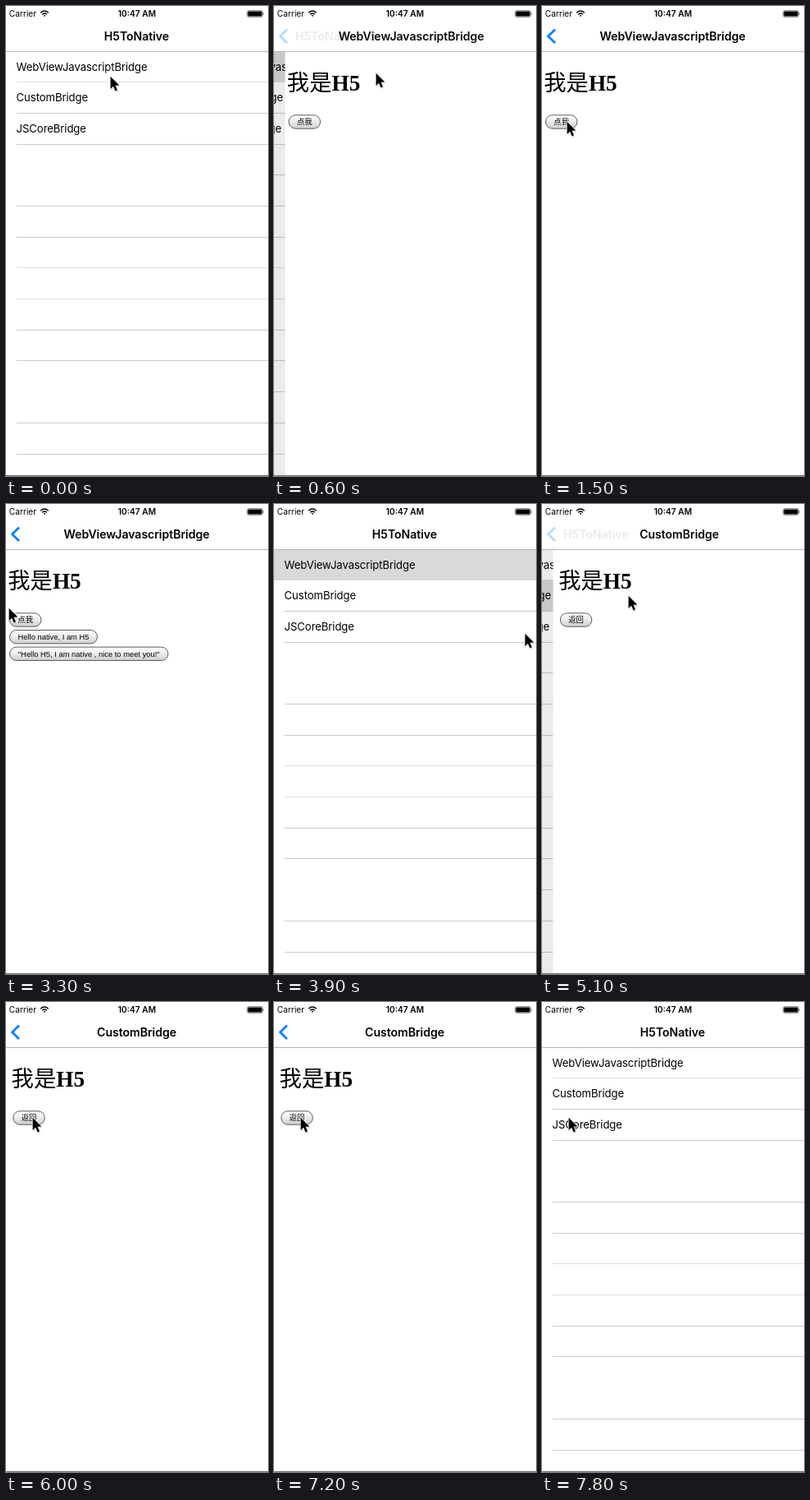
Recreate the animation shown at these times as an HTML page. Size 320 by 572 pixels, loop 8 s.

```html
<!DOCTYPE html>
<html lang="en">
<head>
<meta charset="utf-8">
<title>H5ToNative</title>
<style>
  html, body { margin: 0; width: 100%; height: 100%; overflow: hidden; background: #fff; }
  svg { display: block; }
  text { fill: #000; white-space: pre; }
  .status { font: 400 10.2px Inter, sans-serif; }
  .clock { font-weight: 600; }
  .title { font: 600 14.2px Inter, sans-serif; letter-spacing: -.1px; text-anchor: middle; }
  .row { font: 400 13.2px Inter, sans-serif; letter-spacing: -.12px; }
  .head { font: 700 27.3px "Liberation Serif", serif; }
  .han { font-family: "Noto Sans CJK SC", "Noto Sans CJK", sans-serif; font-weight: 500; }
  .btn { font: 400 9.4px "Liberation Sans", "Noto Sans CJK SC", "Noto Sans CJK", sans-serif; text-anchor: middle; }
</style>
</head>
<body>
<svg width="320" height="572" viewBox="0 0 320 572">
  <defs>
    <linearGradient id="gloss" x2="0" y2="1">
      <stop offset="0" stop-color="#fff"/>
      <stop offset=".5" stop-color="#ebebeb"/>
      <stop offset="1" stop-color="#cdcdcd"/>
    </linearGradient>
  </defs>
  <rect width="320" height="572" fill="#fff"/>
  <g id="list"></g>
  <rect id="dim" y="56" width="320" height="515"/>
  <g id="page"></g>
  <rect width="320" height="55" fill="#fff"/>
  <path d="M0 55.5H320" stroke="#b4b4b4"/>
  <path d="M0 571.5H320" stroke="#707070"/>
  <text class="title" id="home" x="159.5" y="42">H5ToNative</text>
  <text class="title" id="name" x="159.5" y="42"></text>
  <path id="back" d="M16 28.5L7.6 36.8L16 45" fill="none" stroke="#0f80fb" stroke-width="2.8"/>
  <text class="status" x="3.8" y="13">Carrier</text>
  <g fill="none" stroke="#000" stroke-width="1.5">
    <path d="M42.2 8.2Q47 3.8 51.8 8.2M44.2 10.2Q47 7.8 49.8 10.2"/>
    <path d="M47 13L45.6 11.5Q47 10.4 48.4 11.5Z" fill="#000" stroke="none"/>
  </g>
  <text class="status clock" x="136.8" y="13">10:47 AM</text>
  <rect x="294.6" y="5.6" width="18.8" height="7.8" rx="1.8" fill="none" stroke="#555" stroke-width=".7"/>
  <rect x="295.4" y="6.4" width="17.2" height="6.2" rx="1"/>
  <path d="M314.3 8.2Q315.8 9.6 314.3 11Z"/>
  <g id="cursor">
    <g transform="translate(.6 .8) scale(.94)">
      <path d="M1 2V18L4.7 14.5L7.3 20.3L10 19.1L7.4 13.5L12.5 13.3Z" opacity=".18"/>
      <path d="M0 0V16.2L3.7 12.7L6.3 18.7L9 17.5L6.4 11.7L11.5 11.5Z"
        stroke="#fff" stroke-width="1.6" paint-order="stroke"/>
    </g>
  </g>
</svg>
<script>
const $ = id => document.getElementById(id);
const LOOP = 8000, TICK = 300, PUSH = 500, WIDTH = 320, PITCH = 37.69;
const rows = ["WebViewJavascriptBridge", "CustomBridge", "JSCoreBridge"];
const greetings = ["Hello native, I am H5", '"Hello H5, I am native , nice to meet you!"'];

// All times in ms; the first page is dragged away by the cursor, the second closes at once.
const visits = [
  { page: 0, open: 300, greet: 2100, drag: 3300, close: 3900, deselect: 4200 },
  { page: 1, open: 4800, close: 7500, deselect: 7500 }
];

// Cursor stops: time, x, y
const stops = [
  [0, 127, 85], [300, 124, 81], [900, 124, 81], [1200, 106, 106], [1500, 30, 140],
  [2400, 30, 140], [2700, 5, 136], [3300, 3, 126], [3900, 306, 157], [4200, 155, 72],
  [4500, 110, 73], [4800, 110, 73], [5100, 105, 111], [5400, 105, 112], [6000, 32, 140]
];

function cursorAt(t) {
  const i = stops.findLastIndex(s => s[0] <= t);
  const [t0, x0, y0] = stops[i];
  const [t1, x1, y1] = stops[i + 1] || [LOOP, x0, y0];
  const u = (t - t0) / (t1 - t0);
  return [x0 + (x1 - x0) * u, y0 + (y1 - y0) * u];
}

function pageOffset(visit, t, cursorX) {
  if (t <= visit.open || t >= visit.close) return WIDTH;
  if (t > visit.drag) return cursorX;
  return WIDTH * Math.max(0, 1 - (t - visit.open) / PUSH) ** 3.45;
}

function button(x, y, width, label) {
  return `<rect x="${x + .5}" y="${y + .5}" width="${width - 1}" height="16.4" rx="8.2"
    fill="url(#gloss)" stroke="#5c5c5c"/>
    <text class="btn" x="${x + width / 2}" y="${y + 12.1}">${label}</text>`;
}

function listMarkup(selected, moving) {
  let out = "";
  if (selected >= 0) {
    const top = Math.round(55.4 + selected * PITCH);
    out += `<rect y="${top}" width="${WIDTH}" height="38" fill="#d9d9d9"/>`;
  }
  for (let k = 1; k <= 13; k++) {
    // Scaled hairlines fade, and vanish at rest, in a repeating pattern.
    if (!moving && k % 7 === 4) continue;
    const y = Math.floor(55.05 + k * PITCH) + .5;
    out += `<path d="M13 ${y}H${WIDTH}" stroke="${k % 7 < 2 ? "#dedede" : "#cacaca"}"/>`;
  }
  rows.forEach((label, i) => {
    out += `<text class="row" x="12.6" y="${78.6 + i * PITCH}">${label}</text>`;
  });
  return out;
}

function pageMarkup(page, greeted) {
  const left = page ? 6.6 : 2.3;
  let out = `<rect y="56" width="${WIDTH}" height="515" fill="#fff"/>
    <text class="head" x="${left}" y="103"><tspan class="han">我是</tspan>H5</text>`;
  out += button(left + 1.7, 132.3, 39.5, page ? "返回" : "点我");
  if (greeted) {
    out += button(4, 153, 108, greetings[0]) + button(4, 173.6, 194.5, greetings[1]);
  }
  return out;
}

const move = (id, x, y = 0) => $(id).setAttribute("transform", `translate(${x} ${y})`);
const fade = (id, value) => $(id).setAttribute("opacity", value);

function render(t) {
  const [x, y] = cursorAt(t);
  const visit = visits.findLast(v => v.open <= t) || visits[0];
  const { page, open, greet, deselect } = visit;
  const offset = pageOffset(visit, t, x);
  const cover = 1 - offset / WIDTH;
  const selected = t > open && t < deselect ? page : -1;

  $("list").innerHTML = listMarkup(selected, cover > 0);
  $("page").innerHTML = pageMarkup(page, t >= greet);
  $("name").textContent = rows[page];
  move("list", -.29 * WIDTH * cover);
  move("page", offset);
  move("home", -98 * cover);
  move("name", .6 * offset);
  move("cursor", x, y);
  fade("dim", .08 * cover);
  fade("home", (1 - cover) ** .8);
  fade("name", cover);
  fade("back", cover ** 28);
}

// The screen refreshes in steps of TICK.
let shown;
function frame() {
  const t = Math.floor(performance.now() % LOOP / TICK) * TICK;
  if (t !== shown) render(shown = t);
  requestAnimationFrame(frame);
}
frame();
</script>
</body>
</html>
```
